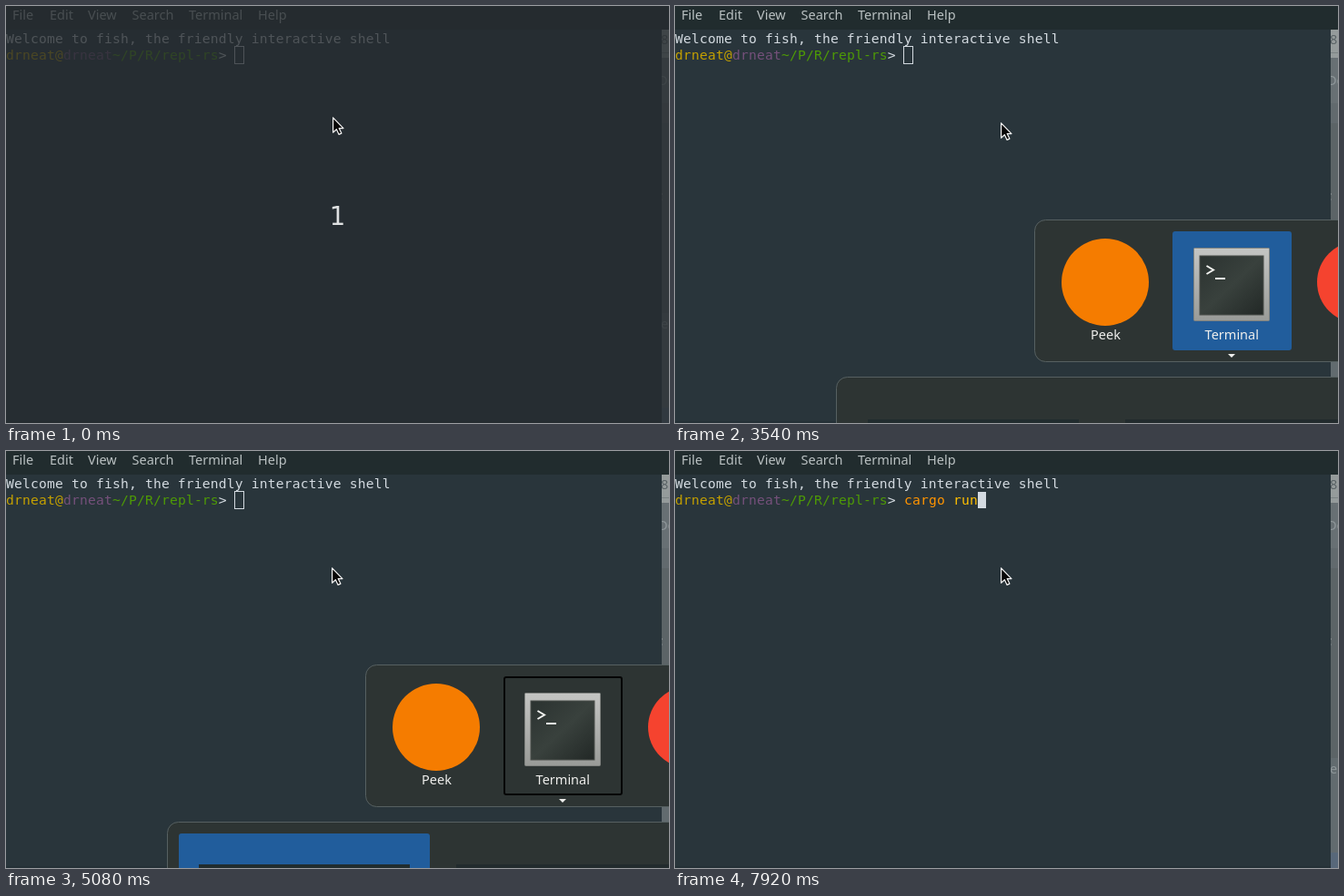
Recreate the animation shown at these times as an HTML page. Size 729 by 459 pixels, loop 8000 ms.

```html
<!DOCTYPE html>
<html lang="en">
<head>
<meta charset="utf-8">
<title>Terminal session</title>
<style>
  html, body { margin: 0; width: 100%; height: 100%; overflow: hidden; background: #29353b; }
  svg { display: block; }
  text { white-space: pre; }
  .mono { font: 14.667px "DejaVu Sans Mono", monospace; letter-spacing: .17px; fill: #d3dae0; }
  .ui { font: 14.5px "Noto Sans", "Open Sans", sans-serif; }
  .label { fill: #eeeeec; text-anchor: middle; }
  .panel { fill: #2d3433; stroke: #566061; }
</style>
</head>
<body>
<svg width="729" height="459" viewBox="0 0 729 459">
  <defs>
    <clipPath id="edge"><rect x="721" y="26" width="8" height="433"/></clipPath>
    <linearGradient id="screen" x2="1" y2="1">
      <stop stop-color="#2b3230"/><stop offset=".5" stop-color="#39413d"/><stop offset="1" stop-color="#222826"/>
    </linearGradient>
    <linearGradient id="bezel" x2="0" y2="1">
      <stop stop-color="#c4c5c3"/><stop offset="1" stop-color="#999b98"/>
    </linearGradient>
  </defs>

  <rect width="729" height="459" fill="#29353b"/>
  <rect width="729" height="26" fill="#212c2e"/>
  <rect y="457" width="721" height="2" fill="#243036"/>
  <g class="ui" id="menu" fill="#bac1c2"></g>

  <!-- sliver of the window behind -->
  <g class="ui" clip-path="url(#edge)">
    <rect x="721" y="26" width="8" height="433" fill="#5c6467"/>
    <rect x="721" y="26" width="8" height="31" fill="#959b9b"/>
    <rect x="721" y="51" width="8" height="1" fill="#7b8384"/>
    <rect x="721" y="57" width="8" height="50" fill="#687074"/>
    <rect x="721" y="107" width="8" height="22" fill="#626a6e"/>
    <rect x="721" y="338" width="8" height="121" fill="#626b6f"/>
    <rect x="721" y="442" width="8" height="17" fill="#58687a"/>
    <text x="720" y="42" fill="#596265">8</text>
    <text x="717" y="87" fill="#8f979a">Do</text>
    <text x="719" y="214" fill="#92999b">;</text>
    <text x="720" y="355" fill="#8f979a">en</text>
  </g>

  <text class="mono" y="41">Welcome to fish, the friendly interactive shell</text>
  <text class="mono" y="59"><tspan fill="#c4a000">drneat@</tspan><tspan fill="#75507b">drneat</tspan><tspan fill="#4e9a06">~/P/R/repl-rs</tspan>&gt;</text>
  <rect id="hollow" x="251.5" y="44.5" width="10" height="19" fill="none" stroke="#d3dae0"/>
  <rect id="block" y="45" width="9" height="18" fill="#d3dae0"/>
  <text class="mono" x="252" y="59"><tspan id="cmd"></tspan><tspan id="arg" fill="#ffc000"></tspan><tspan id="under" fill="#29353b"></tspan><tspan id="hint" fill="#ffc473"></tspan></text>

  <g id="apps">
    <rect class="panel" x="395.5" y="235.5" width="400" height="156" rx="12"/>
    <rect id="appBox" x="548" y="249" width="129" height="129" rx="2" stroke-width="2"/>
    <circle cx="473" cy="304" r="48" fill="#f57c00"/>
    <circle cx="751" cy="304" r="45" fill="#f5432f"/>
    <rect x="570.5" y="266.5" width="83" height="80" rx="1" fill="url(#bezel)" stroke="#7f827f"/>
    <rect x="577" y="275" width="70" height="65" fill="url(#screen)" stroke="#4c504d"/>
    <path d="M584.5 286l7.5 4.5-7.5 4.5M594 300h11" fill="none" stroke="#f2f2f0" stroke-width="2"/>
    <g class="ui label">
      <text x="473.5" y="367">Peek</text>
      <text x="612.3" y="367">Terminal</text>
      <text x="751.5" y="367">Firefox</text>
    </g>
    <path d="M608 383h8l-4 4z" fill="#eeeeec"/>
  </g>

  <g id="wins">
    <rect class="panel" x="177.5" y="408.5" width="700" height="200" rx="12"/>
    <rect id="pick" y="421" width="276" height="100" rx="3" fill="#215d9c"/>
    <rect x="212" y="455" width="232" height="60" fill="#212c2e"/>
    <rect x="495" y="455" width="234" height="60" fill="#222b2d"/>
  </g>

  <g id="dim">
    <rect width="729" height="459" fill="#262b30" opacity=".77"/>
    <text x="364.5" y="241" text-anchor="middle" fill="#dfe1e2" font-size="27.5" font-family="DejaVu Sans, sans-serif">1</text>
  </g>

  <path id="mouse" d="M.6 .8V17.2L4.4 13.7 7.1 19.4 9.9 18.1 7.2 12.6H12z" fill="#080808" stroke="#f4f4f4" stroke-width="1.2" stroke-linejoin="round"/>
</svg>
<script>
const LOOP = 8000, CELL = 9;
const el = id => document.getElementById(id);
const set = (id, attrs) => {
  for (const key in attrs) el(id).setAttribute(key, attrs[key]);
};
const show = (id, on) => set(id, { opacity: +on });

el('menu').innerHTML = [['File', 7], ['Edit', 48], ['View', 90], ['Search', 138.5], ['Terminal', 201], ['Help', 277]]
  .map(([name, x]) => `<text x="${x}" y="15">${name}</text>`).join('');

// Each row: start time, then the values that hold from then on
const mousePath = [[0, 359, 122], [2420, 359, 128], [2460, 358, 128]];
const appFade = [[0, 0], [3080, 1], [5290, .66], [5330, .33], [5370, 0]];
const winFade = [[0, 0], [3460, .33], [3500, .66], [3540, 1], [5290, .66], [5330, .33], [5370, 0]];
const picks = [[0, -1], [4500, 0], [4710, 1], [4920, 2], [5080, 0]];
// time, command, argument, suggestion, command is valid
const typing = [
  [0, '', '', ''],
  [5580, 'c', '', 'argo update'],
  [5790, 'ca', '', 'rgo update'],
  [5960, 'cart', '', ''],
  [6540, 'car', '', ''],
  [7170, 'carg', '', 'o update'],
  [7250, 'cargo', '', ' update'],
  [7460, 'cargo ', '', 'update'],
  [7540, 'cargo ', '', 'update', true],
  [7630, 'cargo ', 'r', '', true],
  [7830, 'cargo ', 'ru', '', true],
  [7920, 'cargo ', 'run', '', true]
];
const at = (rows, t) => rows.findLast(row => row[0] <= t).slice(1);

function draw(t) {
  show('dim', t < 40);
  set('mouse', { transform: `translate(${at(mousePath, t)})` });

  const [pick] = at(picks, t);
  set('apps', { opacity: at(appFade, t)[0] });
  set('wins', { opacity: at(winFade, t)[0] });
  set('appBox', pick < 0 ? { fill: '#215d9c', stroke: '#215d9c' } : { fill: 'none', stroke: '#050505' });
  set('pick', { x: 190 + 284 * pick, opacity: +(pick >= 0) });

  const [cmd, arg, hint, valid] = at(typing, t);
  const focused = t >= 5330;
  show('hollow', !focused);
  set('block', { x: 252 + CELL * (cmd + arg).length, opacity: +focused });
  set('cmd', { fill: valid ? '#ff9400' : '#ffdd73' });
  el('cmd').textContent = cmd;
  el('arg').textContent = arg;
  el('under').textContent = hint.slice(0, 1);
  el('hint').textContent = hint.slice(1);
}

const start = performance.now();
function tick() {
  draw((performance.now() - start) % LOOP);
  requestAnimationFrame(tick);
}
tick();
</script>
</body>
</html>
```
